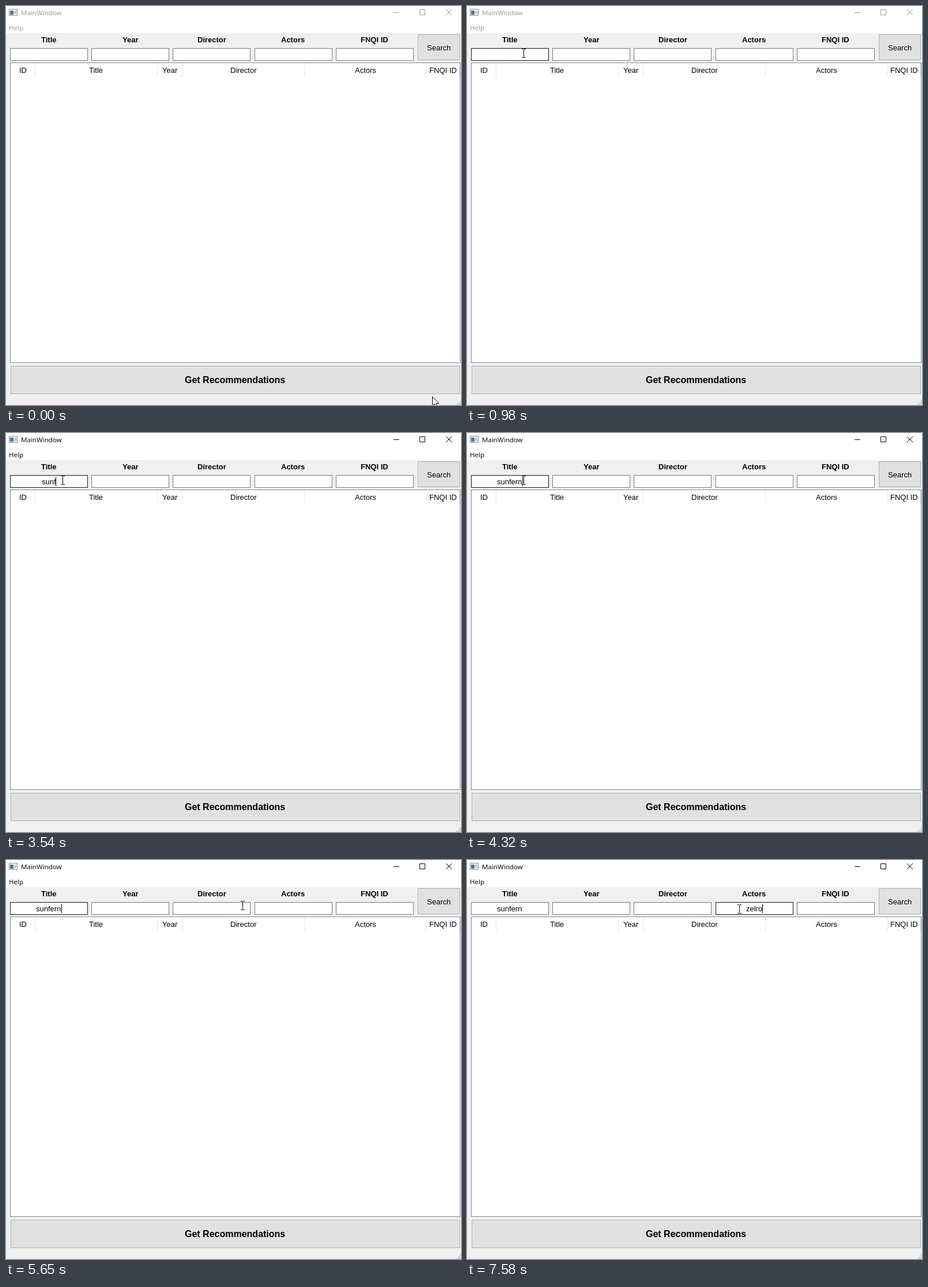
Recreate the animation shown at these times as an HTML page. Size 789 by 692 pixels, loop 8 s.

```html
<!DOCTYPE html>
<html lang="en">
<head>
<meta charset="utf-8">
<title>MainWindow</title>
<style>
  html, body { margin: 0; width: 100%; height: 100%; overflow: hidden; background: #f0f0f0; }
  svg { display: block; }
  text { font: 13px "Liberation Sans", Arial, sans-serif; }
  .b { font-weight: bold; }
  .big { font-size: 16px; }
  .sys { font: 11.6px "Open Sans", "Noto Sans", sans-serif; }
</style>
</head>
<body>
<svg id="stage" width="789" height="692" viewBox="0 0 789 692"></svg>
<script>
const LOOP = 8000, BLINK = 550, CLICK = 120;
const stage = document.getElementById('stage');

// Boxes are given by outer pixel edges and get a 1px border inside.
const box = (x, y, r, b, fill, stroke, attr = '') =>
  `<rect x="${x + .5}" y="${y + .5}" width="${r - x - 1}" height="${b - y - 1}" fill="${fill}" stroke="${stroke}" ${attr}/>`;
const fill = (x, y, w, h, color, attr = '') =>
  `<rect x="${x}" y="${y}" width="${w}" height="${h}" fill="${color}" ${attr}/>`;
const text = (x, y, s, cls = '') => `<text x="${x}" y="${y}" class="${cls}">${s}</text>`;
const label = (mid, y, s, cls = '') => `<text data-mid="${mid}" y="${y}" class="${cls}">${s}</text>`;

// dark: time span in which the border is hovered or focused
const fields = [
  { name: 'Title', dark: [520, 5960] },
  { name: 'Year', dark: [440, 980] },
  { name: 'Director', dark: [5500, 5650] },
  { name: 'Actors', dark: [5730, LOOP] },
  { name: 'FNQI ID', dark: [0, 0] }
].map((f, i) => ({ ...f, x: Math.round(7 + 141.2 * i), mid: 74.4 + 141.2 * i }));
const fieldSvg = (f, i) => label(f.mid, 63, f.name, 'b') +
  box(f.x, 73, f.x + 135, 95, '#fff', '#7a7a7a', `id="field${i}"`);

const edges = [8, 50, 262, 305, 517, 728, 786];
const headerSvg = (s, i) => label((edges[i] + edges[i + 1] + 1) / 2, 116, s) +
  fill(edges[i + 1], 99, 1, 24, '#e5e5e5');

let grip = '';
for (let i = 0; i < 3; i++)
  for (let j = 0; i + j < 3; j++) grip += fill(787 - 3 * i, 690 - 3 * j, 2, 2, '#bfbfbf');

stage.innerHTML =
  fill(0, 0, 789, 692, '#f0f0f0') + fill(0, 0, 789, 47, '#fff') +
  box(5, 5, 20, 17, '#eceff0', '#8b959b') + fill(7, 8, 6, 7, '#4d7d88') + fill(14, 8, 4, 6, '#c5d0d4') +
  `<g id="chrome">${text(26, 16, 'MainWindow', 'sys')}${text(5, 42, 'Help', 'sys')}
    <path id="buttons" fill="none" d="M672 11.5h10M717.5 6.5h9v9h-9zM763 6l10 10M773 6l-10 10"/></g>` +
  fields.map(fieldSvg).join('') +
  box(714, 49, 787, 94, '#e1e1e1', '#adadad') + label(750.5, 77, 'Search') +
  box(7, 98, 788, 619, '#fff', '#828790') +
  ['ID', ...fields.map(f => f.name)].map(headerSvg).join('') +
  box(8, 624, 787, 673, '#e1e1e1', '#adadad') + label(397, 654, 'Get Recommendations', 'b big') +
  grip +
  `<text id="title" y="89"/><text id="actor" y="89"/>` +
  fill(0, 76, 1, 16, '#000', 'id="caret"') +
  `<circle id="click" r="12" fill="#ff0" fill-opacity=".47"/>
  <g id="cursor">
    <path id="arrow" d="M.5 .5v16l3.7-3.5 2.8 6 2.2-1-2.7-5.8h5.1z" fill="#fff" stroke="#000"/>
    <path id="beam" d="M-3-8h3v1h1v-1h3v1h-3v14h3v1h-3v-1h-1v1h-3v-1h3v-14h-3z"/>
  </g>`;

const el = id => document.getElementById(id);
const show = (node, on) => node.setAttribute('visibility', on ? 'visible' : 'hidden');
const during = (t, [from, to]) => t >= from && t < to;

// Centres a text on whole pixels.
const center = (node, mid) => node.setAttribute('x', Math.round(mid - node.getComputedTextLength() / 2));
stage.querySelectorAll('[data-mid]').forEach(node => center(node, +node.dataset.mid));

const mouse = [
  [70, 739, 677], [440, 118, 86], [750, 98, 82], [5260, 98, 82],
  [5270, 155, 66], [5960, 474, 82], [6100, 474, 82], [6190, 472, 85]
];
function mouseAt(t) {
  const next = mouse.findIndex(p => p[0] > t);
  if (next < 1) return mouse.at(next).slice(1);
  const [t0, x0, y0] = mouse[next - 1], [t1, x1, y1] = mouse[next];
  const ease = 1 - (1 - (t - t0) / (t1 - t0)) ** 2;
  return [Math.round(x0 + (x1 - x0) * ease), Math.round(y0 + (y1 - y0) * ease)];
}

// A click focuses an entry at "focus"; its word is then typed at an even pace.
const entries = [
  { node: el('title'), mid: 74, word: 'sunfern', focus: 1670, blur: 5960, first: 2840, pace: 233 },
  { node: el('actor'), mid: 498, word: 'zelro', focus: 5960, blur: LOOP, first: 6960, pace: 155 }
];

function drawEntry({ node, mid, word, focus, blur, first, pace }, t) {
  const typed = Math.max(0, Math.min(word.length, Math.floor((t - first) / pace) + 1));
  node.textContent = word.slice(0, typed);
  center(node, mid);
  if (!during(t, [focus, blur])) return;

  const lastInput = typed ? first + (typed - 1) * pace : focus;
  if (Math.floor((t - lastInput) / BLINK) % 2 === 0) {
    el('caret').setAttribute('x', Math.round(mid + node.getComputedTextLength() / 2));
    show(el('caret'), true);
  }
}

function draw(t) {
  const color = t < entries[0].focus ? '#999' : '#000';
  el('chrome').setAttribute('fill', color);
  el('buttons').setAttribute('stroke', color);

  fields.forEach((f, i) =>
    el('field' + i).setAttribute('stroke', during(t, f.dark) ? '#171717' : '#7a7a7a'));

  show(el('caret'), false);
  entries.forEach(entry => drawEntry(entry, t));

  const [x, y] = mouseAt(t);
  const overField = during(y, [73, 95]) && fields.some(f => during(x, [f.x, f.x + 135]));
  el('cursor').setAttribute('transform', `translate(${x} ${y})`);
  show(el('arrow'), !overField);
  show(el('beam'), overField);
  el('click').setAttribute('cx', x - 2);
  el('click').setAttribute('cy', y - 1);
  show(el('click'), entries.some(e => during(t, [e.focus, e.focus + CLICK])));
}

const start = performance.now();
function tick() {
  draw((performance.now() - start) % LOOP);
  requestAnimationFrame(tick);
}
tick();
</script>
</body>
</html>
```
